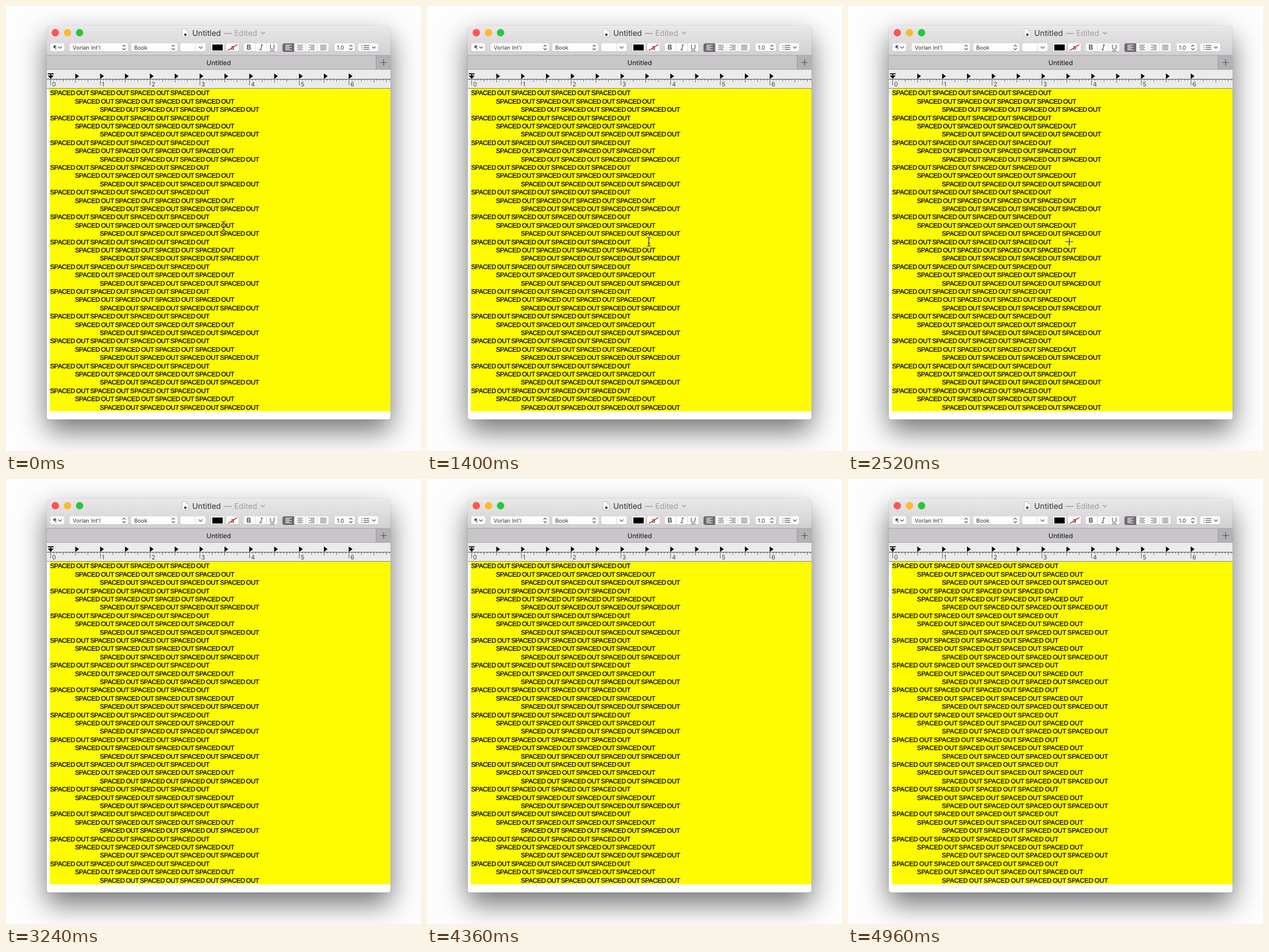
An HTML page for the animation above (5 s loop, 722 by 775 pixels).

```html
<!DOCTYPE html>
<html lang="en">
<head>
<meta charset="utf-8">
<title>Spaced out</title>
<style>
html, body { margin: 0; width: 100%; height: 100%; overflow: hidden; background: #fdfdfd; }
.window {
  position: absolute; left: 71px; top: 35px; width: 598px; height: 685px;
  border-radius: 6px 6px 4px 4px; background: #fff;
  box-shadow: 0 0 1px rgba(0,0,0,.5), 0 20px 48px rgba(0,0,0,.55);
}
svg { position: absolute; left: 0; top: 0; display: block; }
text { font-family: Inter, sans-serif; text-rendering: geometricPrecision; white-space: pre; }
.body text {
  font: 11.2px "Liberation Sans", Arial, sans-serif;
  word-spacing: -.9px; stroke: #000; stroke-width: .32px;
  animation: loosen 5s step-end infinite;
}
.small { font-size: 9.6px; fill: #333; }
.line { fill: none; stroke: #555; stroke-width: 1.2; stroke-linecap: round; stroke-linejoin: round; }
.halo { fill: none; stroke: #fff; stroke-width: 3; opacity: .75; }
.ink { fill: none; stroke: #111; stroke-width: 1.2; }
.pointer { animation: move 5s infinite; }
.beam { animation: beam 5s step-end infinite; }
.cross { animation: cross 5s step-end infinite; }
@keyframes loosen { 0% { letter-spacing: -.3px } 95% { letter-spacing: -.015px } }
@keyframes move {
  0%, 1.6% { transform: translate(378.5px, 383px); animation-timing-function: ease-in-out }
  10%, 100% { transform: translate(386px, 410.5px) }
}
@keyframes beam { 0% { opacity: 1 } 40% { opacity: 0 } }
@keyframes cross { 0% { opacity: 0 } 40% { opacity: 1 } 57.6% { opacity: 0 } }
</style>
</head>
<body>
<div class="window"></div>
<svg id="stage" width="722" height="775" viewBox="0 0 722 775">
  <defs>
    <linearGradient id="bar" x2="0" y2="1">
      <stop stop-color="#e9e7e9"/><stop offset="1" stop-color="#d2d0d2"/>
    </linearGradient>
  </defs>
  <path d="M71 86V41q0-6 6-6H663q6 0 6 6V86Z" fill="url(#bar)"/>
  <path d="M77 35.5H663" stroke="#f5f4f5"/>
  <g id="chrome"></g>
  <g id="ruler"></g>
  <path fill="#fffb00" d="M76 144H669V706H76Z"/>
  <g id="lines" class="body"></g>
  <g class="pointer">
    <g class="beam" id="beam"></g>
    <g class="cross" id="cross"></g>
  </g>
</svg>
<script>
const put = (id, markup) => { document.getElementById(id).innerHTML = markup; };
const repeat = (n, fn) => Array.from({ length: n }, (_, i) => fn(i)).join('');
const rect = (x, y, w, h, fill, extra = '') =>
  `<rect x="${x}" y="${y}" width="${w}" height="${h}" fill="${fill}" ${extra}/>`;
const path = (d, extra = 'class="line"') => `<path d="${d}" ${extra}/>`;
const label = (x, y, s, extra = 'class="small"') => `<text x="${x}" y="${y}" ${extra}>${s}</text>`;
const button = (x, w) =>
  rect(x, 65.5, w, 14.5, '#a9a7a9', 'rx="3.5" opacity=".55"') + rect(x + .5, 65, w - 1, 14, '#fdfdfd', 'rx="3"');
const divider = x => rect(x, 65, 1, 14, '#dcdadc');
const chevron = (x, y, s = 2.6) => path(`M${x - s} ${y - s / 2}l${s} ${s}l${s} ${-s}`);
const stepper = x => path(`M${x - 2.3} 70.3l2.3-2.4l2.3 2.4M${x - 2.3} 74l2.3 2.4l2.3-2.4`);
const disc = (x, fill) => `<circle cx="${x}" cy="46.5" r="6.4" fill="${fill}"/>`;

// Five text rows; the short ones are trimmed on one side.
const align = (x, ink, side, short = 7) => repeat(5, i => {
  const w = i % 2 ? short : 11;
  return rect(x + side * (11 - w), 67.5 + i * 2.1, w, 1, ink);
});

const title =
  disc(85.8, '#fc5650') + disc(107, '#fdb92c') + disc(128, '#29c73b') +
  path('M306.5 39.5h7l4 4v10.5h-11Z', 'fill="#fff" stroke="#b8b6b8" stroke-width=".8"') +
  path('M313.5 39.5v4h4', 'fill="#e4e4e4" stroke="#b8b6b8" stroke-width=".6"') +
  rect(310, 48, 4, 4, '#55504c') +
  label(324, 52, 'Untitled', 'font-size="13.6" fill="#333"') +
  label(379, 52, '—', 'font-size="13.6" fill="#8e8c8e"') +
  label(397, 52, 'Edited', 'font-size="13.5" fill="#a09ea0"') +
  path('M443.5 45.2l3.4 3.4l3.4-3.4', 'fill="none" stroke="#a09ea0" stroke-width="1.4"');

const tools =
  button(76.5, 25.5) + label(82, 76, '¶', 'font-size="10" fill="#333"') + chevron(94, 72.3) +
  button(110, 103) + label(116, 75.8, "Vorlan Int'l") + stepper(205.5) +
  button(217, 82) + label(223, 75.8, 'Book') + stepper(291) +
  button(302.5, 45.5) + divider(329) + chevron(338.5, 72.3, 3) +
  button(356, 24.5) + rect(359, 67, 18, 10.5, '#000') +
  button(382.5, 23) + label(391, 76, 'a', 'font-size="11" fill="#222"') +
  path('M386 77.5L402.5 67', 'stroke="#e0342c" stroke-width="1.5"') +
  button(413, 60) + divider(433) + divider(453) +
  label(418.5, 76.3, 'B', 'font-size="12" font-weight="700" fill="#555"') +
  path('M443.7 67.8h3M441.5 76.3h3M445.2 67.8l-2.2 8.5') +
  path('M460 67.5v4.8a3.2 3.2 0 0 0 6.4 0v-4.8M459.5 78h7.5') +
  button(481, 81) + path('M501.5 65V80H484.5q-3.5 0-3.5-3.5V68.5q0-3.5 3.5-3.5Z', 'fill="#6c696c"') +
  divider(521) + divider(541) +
  align(486, '#fff', 0) + align(506, '#777', .5) + align(526, '#777', 1) + align(546.5, '#777', 0, 11) +
  button(571, 36.5) + label(575.5, 75.8, '1.0') + stepper(600) +
  button(612, 36) + chevron(640, 72.3) +
  repeat(3, i => rect(618.5, 68 + i * 3.4, 1.5, 1.3, '#555') + rect(622, 68 + i * 3.4, 10, 1.2, '#555'));

const tabs =
  rect(71, 86, 598, 25, '#c9c6ca') + rect(644, 86, 25, 25, '#b4b1b5') +
  rect(71, 85.5, 598, 1, '#a6a3a7') + rect(71, 110, 598, 1, '#a6a3a7') + rect(643.5, 86, 1, 24, '#98959a') +
  label(370, 103, 'Untitled', 'font-size="11.4" font-weight="500" fill="#2a2a2a" text-anchor="middle"') +
  path('M651.5 98.5h11M657 93v11', 'stroke="#555" stroke-width="1.2"');

put('chrome', title + tools + tabs);

const INCH = 86.5, LEFT = 77.3;
put('ruler',
  rect(71, 111, 598, 33, '#ebebeb') + rect(71, 127, 598, 1, '#555') + rect(71, 143, 598, 1, '#8d8b70') +
  repeat(110, i => {
    const h = i % 16 === 0 ? 10 : i % 8 === 0 ? 5 : i % 4 === 0 ? 4 : 2;
    return rect(LEFT + i * INCH / 16, 128, .9, h, '#555');
  }) +
  repeat(7, i => label(LEFT + 3 + i * INCH, 139.8, i, 'font-size="10.5" fill="#444"')) +
  repeat(12, i => path(`M${LEFT + (i + 1) * INCH / 2} 117.5l6.5 4.7l-6.5 4.7Z`, 'fill="#000"')) +
  rect(72.8, 117.3, 10, 1.7, '#000') + path('M72.8 121h10l-5 6Z', 'fill="#000"') + rect(77, 119, 1.5, 3, '#000'));

const phrase = Array(4).fill('SPACED OUT').join(' ');
put('lines', repeat(39, i => label(76.7 + i % 3 * 43.25, 155.4 + i * 14.4, phrase, '')));

const outlined = d => path(d, 'class="halo"') + path(d, 'class="ink"');
put('beam', outlined('M-3.5-8Q0-8 0-5.5Q0-8 3.5-8M0-5.5V5.5M-3.5 8Q0 8 0 5.5Q0 8 3.5 8M-2 2.5H2'));
put('cross', outlined('M-8 0H6M-1-7V7'));
</script>
</body>
</html>
```
